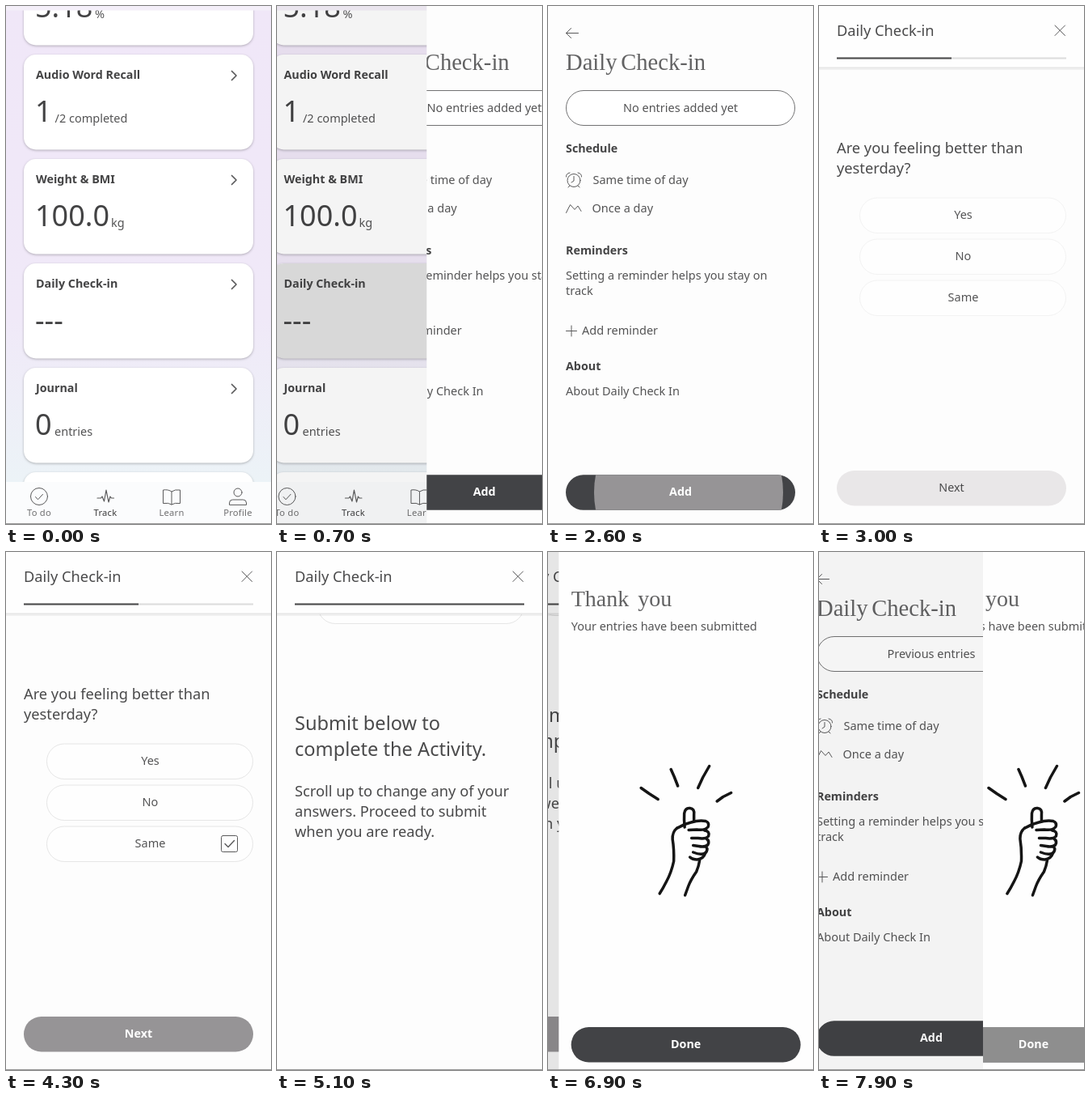
An HTML page for the animation above (8 s loop, 328 by 640 pixels).

```html
<!DOCTYPE html>
<html lang="en">
<head>
<meta charset="utf-8">
<title>Daily Check-in</title>
<style>
  html, body { margin: 0; width: 100%; height: 100%; overflow: hidden; background: #fdfdfd; }
  #stage { display: block; width: 328px; height: 640px; }
  text { font-family: "Noto Sans", sans-serif; font-size: 14.5px; fill: #545455; stroke: none; white-space: pre; }
  .semi { font-weight: 600; font-size: 14.3px; fill: #444445; }
  .medium { font-weight: 500; }
  .mid { text-anchor: middle; }
  .value { font-size: 36px; fill: #434344; }
  .tab { font-size: 11.2px; letter-spacing: .25px; text-anchor: middle; fill: #707071; }
  .tab.on { font-weight: 500; fill: #3c3c3d; }
  .serif { font-family: "Liberation Serif", serif; font-size: 28.6px; word-spacing: -2.5px; fill: #626263; }
  .body { font-size: 18.25px; fill: #4a4a4b; }
  .big { font-size: 23.6px; fill: #4a4a4b; }
  .card { fill: #fff; filter: drop-shadow(0 1px 1.5px #0004); }
  .line { fill: none; stroke: #5a5a5b; stroke-linecap: round; stroke-linejoin: round; }
  .ink { fill: none; stroke: #151515; stroke-linecap: round; stroke-linejoin: round; }
</style>
</head>
<body>
<svg id="stage" viewBox="0 0 328 640"></svg>
<script>
const W = 328, H = 640, LOOP = 8000, STEP = 100;

const text = (x, y, str, cls = '') => `<text x="${x}" y="${y}" class="${cls}">${str}</text>`;
const box = (x, y, w, h, r, attrs) => `<rect x="${x}" y="${y}" width="${w}" height="${h}" rx="${r}" ${attrs}/>`;
const line = (d, width = 1, cls = 'line') => `<path d="${d}" class="${cls}" stroke-width="${width}"/>`;
const ring = (x, y, r) => `<circle cx="${x}" cy="${y}" r="${r}" class="line"/>`;

// A shape with a clipped circle that spreads over it when tapped.
const ripple = (id, x, y, w, h, r, cx, fill) =>
  `<clipPath id="${id}Clip">${box(x, y, w, h, r, '')}</clipPath>
   <circle id="${id}Ripple" cx="${cx}" cy="${y + h / 2}" r="0" fill="${fill}" clip-path="url(#${id}Clip)"/>`;
const button = (id, y, label, tapped = '#969496') =>
  box(22, y, 284, 43.5, 21.7, `id="${id}Fill" fill="#424346"`) +
  ripple(id, 22, y, 284, 43.5, 21.7, 174, tapped) +
  `<text id="${id}Label" x="164" y="${y + 26}" class="mid semi" style="fill:#fff">${label}</text>`;

const screen = (id, fill, content) =>
  `<svg id="${id}" width="${W}" height="${H}"><g id="${id}Body">
   ${box(0, 0, W, H, 0, `fill="${fill}"`)}${content}</g>
   ${box(0, 0, W, H, 0, `id="${id}Dim" opacity="0"`)}</svg>`;

const cards = [
  ['', '5.18', '%', 110],
  ['Audio Word Recall', '1', '/2 completed', 60.5],
  ['Weight &amp; BMI', '100.0', 'kg', 130],
  ['Daily Check-in', '---', '', 80],
  ['Journal', '0', 'entries', 60],
  ['', '', '', 0],
].map(([title, value, unit, unitX], i) => {
  const y = -69 + i * 129;
  return box(22, y, 284, 117.5, 15, 'class="card"') +
    (i === 3 ? ripple('card', 22, y, 284, 117.5, 15, 164, '#0000001d') : '') +
    text(37, y + 30, title, 'semi') +
    line(`M279.5 ${y + 20.5}l5.500 5.500l-5.500 5.500`, 1.7) +
    text(36, y + 82.5, value, value === '---' ? 'value medium' : 'value') +
    text(unitX, y + 83.5, unit);
}).join('');

const tabs =
  box(0, 588, W, 52, 0, 'fill="#fbfcfd"') +
  ring(41, 606, 10.5) + line('M36.5 606.5l3 3.3l6-6.5') +
  line('M113 608h4.5l1.5-2l2.5 6l2.5-14l3 15l2-7l1.5 2h3', 1.2) +
  line('M205 600q-4-3-10.5-2v16.5q7-1 10.5 1.5q3.5-2.5 10.5-1.5v-16.5q-6.5-1-10.5 2v16') +
  ring(287, 601, 5) + line('M276.5 616v-2q0-4 4-4h13q4 0 4 4v2z') +
  text(41, 630, 'To do', 'tab') + text(123, 630, 'Track', 'tab on') +
  text(205, 630, 'Learn', 'tab') + text(287, 630, 'Profile', 'tab');

const list = screen('list', 'url(#sky)', cards + box(0, 0, W, 5.5, 0, 'fill="#f4eff9"') + tabs);

const detail = screen('detail', '#fdfdfd',
  line('M37.5 33.5h-15l6-6m-6 6l6 6') +
  text(22, 79, 'Daily Check-in', 'serif') +
  box(22.5, 104.5, 283, 43, 21.5, 'fill="#fff" stroke="#727273"') +
  '<text id="entries" x="164" y="131" class="mid medium"></text>' +
  text(22, 181, 'Schedule', 'semi') +
  ring(32, 215.5, 8) + line('M32 210.5v5.5l-3 2M22.5 211q-.5-4 4.5-5M41.5 211q.5-4-4.5-5M27 222l-2 2M37 222l2 2') +
  text(55.5, 220, 'Same time of day') +
  line('M22.5 255.5l5-10l5.5 6l4-4.5l4 6.5') +
  text(54.5, 255, 'Once a day') +
  text(22, 307, 'Reminders', 'semi') +
  text(22, 338, 'Setting a reminder helps you stay on') + text(22, 357, 'track') +
  line('M22.5 401.5h13m-6.5-6.5v13') + text(42, 406, 'Add reminder', 'medium') +
  text(22, 450, 'About', 'semi') + text(22, 481, 'About Daily Check In') +
  button('add', 579.3, 'Add'));

const options = ['Yes', 'No', 'Same'].map((label, i) =>
  box(50.5, 237 + i * 51, 255, 43.5, 21.7, 'fill="#fefefe"') +
  text(178.5, 263 + i * 51, label, 'mid medium')).join('');

const check = screen('check', '#fdfdfd',
  `<g id="scroller">
    ${text(22, 182, 'Are you feeling better than', 'body')}${text(22, 207, 'yesterday?', 'body')}
    <g id="options">${options}</g>
    <g id="tick">${box(266.5, 350.5, 20, 20, 2, 'class="line"')}${line('M271 360.5l4 4l7.5-8', 1.4)}</g>
    <g id="ending">
      ${text(22, 514, 'Submit below to', 'big')}${text(22, 546, 'complete the Activity.', 'big')}
      ${text(22, 596, 'Scroll up to change any of your', 'body')}
      ${text(22, 621, 'answers. Proceed to submit', 'body')}
      ${text(22, 646, 'when you are ready.', 'body')}
    </g>
  </g>` +
  box(0, 76, W, 3, 0, 'fill="#000" opacity=".05"') +
  box(0, 0, W, 76, 0, 'fill="#fefefe"') + box(0, 75.5, W, 1.5, 0, 'fill="#e6e6e6"') +
  text(22, 36.5, 'Daily Check-in', 'body') + line('M292 24l12.5 12.5m0-12.5l-12.5 12.5') +
  box(22, 63.5, 284, 2, 0, 'fill="#dcdcdc"') + box(22, 63.5, 142, 2, 0, 'id="progress" fill="#4a4a4b"') +
  `<g id="footer">${button('next', 574, 'Next')}
    <path id="spinner" d="M171.5 584a14 14 0 0 1 0 24" fill="none" stroke="#fff" stroke-width="3"/></g>`);

const done = screen('done', '#fefefe',
  `<text x="22" y="67" class="serif" style="font-size:28px;word-spacing:4px">Thank you</text>` +
  text(22, 96.5, 'Your entries have been submitted') +
  `<g transform="translate(-101)">` + [
    'M209.5 291.5l10 7l11 7M246.5 268.5l4 9l4.5 11.5M294 264.5l-8 14l-6 13M321 297.5l-10 5l-7.5 5.5',
    'M263.5 340q-1-9-.5-17q1-7 7-6.5q6 .5 5 8l0 8',
    'M254.5 341q8-5 17-7q10-3 18-1.5q5 2 3 7q-4 5-14 3.5l-10 .5',
    'M288 344q7 1 5 7q-3 4-13 2.5l-8 0M290 354q5 3 2 8q-4 3-11 1.5l-7-1M290 364q3 4-1 8q-5 3-15-1',
    'M289 372q-2 7-10 8q-6 0-9-3M254 341q-6 5-5.5 14q2 12 1.5 27q-3 14-9 25q-4 8-8.5 15',
    'M282 381q-1 7-4 14q-7 10-10 18l-4 11',
  ].map(d => line(d, 3.5, 'ink')).join('') + '</g>' +
  button('done', 587, 'Done', '#8e8e8e'));

document.getElementById('stage').innerHTML =
  `<defs><linearGradient id="sky" x2="0" y2="1">
    <stop stop-color="#f0e7f8"/><stop offset=".6" stop-color="#f0e9f8"/><stop offset=".92" stop-color="#ecf3f7"/>
  </linearGradient></defs>` + list + detail + check + done +
  box(0, 639, W, 1, 0, 'fill="#999"');

const $ = id => document.getElementById(id);
const set = (id, attrs) => { for (const k in attrs) $(id).setAttribute(k, attrs[k]); };
const show = (id, on) => set(id, { visibility: on ? 'visible' : 'hidden' });

// cubic-bezier(.4, 0, .2, 1)
function ease(x) {
  if (x <= 0) return 0;
  if (x >= 1) return 1;
  let lo = 0, hi = 1, s;
  for (let i = 0; i < 20; i++) {
    s = (lo + hi) / 2;
    const bx = 1.2 * s * (1 - s) ** 2 + .6 * s * s * (1 - s) + s ** 3;
    if (bx < x) lo = s; else hi = s;
  }
  return s * s * (3 - 2 * s);
}
const slide = (t, start, duration = 400) => ease((t - start) / duration);

// `shown` is how far a screen has entered, `cover` how far the next one hides it.
function place(id, shown, cover) {
  const x = W * (1 - shown);
  show(id, shown > 0);
  set(id, { x });
  set(id + 'Body', { transform: `translate(${-x / 2 - W * .2 * cover})` });
  set(id + 'Dim', { opacity: .1 * cover });
}

function tap(id, t, start, end) {
  const on = t >= start && t < end;
  set(id + 'Ripple', { r: on ? 117 + (t - start) * 1.2 : 0 });
}

function draw(t) {
  const submitted = t >= 7000;
  const toDetail = slide(t, 570);
  const toCheck = submitted ? 0 : slide(t, 2640, 360);
  const toDone = slide(t, 6600) - slide(t, 7739);
  place('list', 1, toDetail);
  place('detail', toDetail, submitted ? toDone : toCheck);
  place('check', toCheck, toDone);
  place('done', toDone, 0);

  tap('card', t, 500, 1000);
  tap('add', t, 2600, 3000);
  tap('next', t, 6200, 6300);
  tap('done', t, 7700, LOOP);
  $('entries').textContent = submitted ? 'Previous entries' : 'No entries added yet';

  const answered = t >= 4300, ending = t >= 5100, loading = t >= 6300;
  const scroll = ending ? 304 - 10 * Math.exp((5100 - t) / 70) : 0;
  set('scroller', { transform: `translate(0 ${-scroll})` });
  set('options', { stroke: answered ? '#e6e6e6' : '#f3f3f3' });
  show('tick', answered && toCheck > 0);
  show('ending', ending && toCheck > 0);
  set('progress', { width: ending ? 284 : 142 });
  set('footer', { transform: `translate(0 ${ending ? 70 * (1 - slide(t, 5100, 300)) : 0})` });
  set('nextFill', { fill: loading ? '#969496' : t >= 4400 ? '#424346' : answered ? '#969496' : '#e9e7e8' });
  $('nextLabel').textContent = loading ? '' : ending ? 'Submit' : 'Next';
  $('nextLabel').style.fill = answered ? '#fff' : '#4a4a4b';
  $('nextLabel').style.fontWeight = answered ? 600 : 500;
  show('spinner', loading && toCheck > 0);
  set('spinner', { transform: `rotate(${(t - 6400) * .36} 165 596)` });
}

function tick() {
  draw(Math.floor(performance.now() % LOOP / STEP) * STEP);
  requestAnimationFrame(tick);
}
tick();
</script>
</body>
</html>
```
